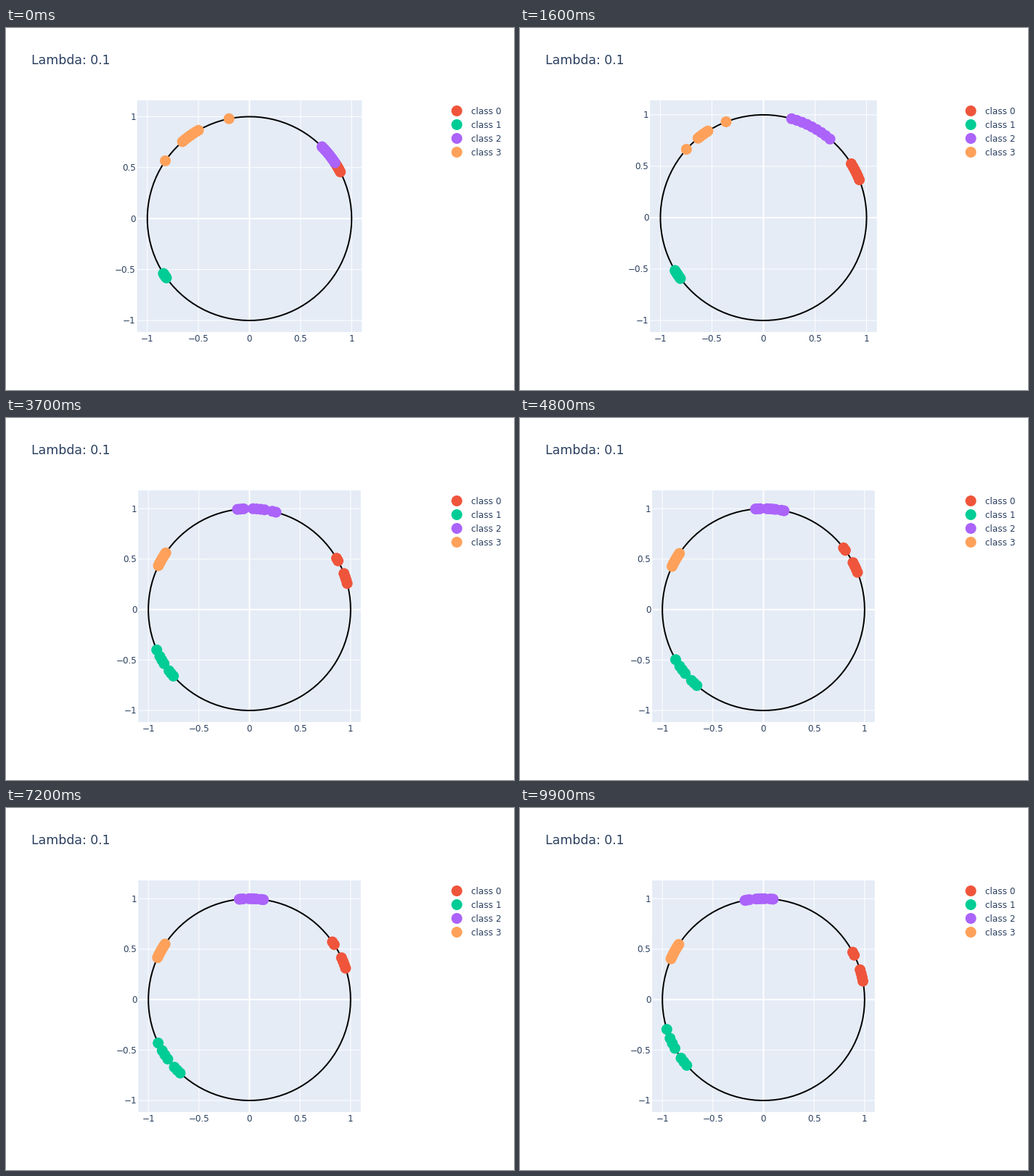
Recreate the animation shown at these times as a matplotlib script. Size 700x500 px, loop 10000 ms.

```python
import numpy as np
import matplotlib.pyplot as plt
from matplotlib.animation import FuncAnimation
from matplotlib.patches import Rectangle

W, H, DPI = 700, 500, 100
FRAMES, INTERVAL = 100, 100
PX = 72 / DPI                      # points per pixel
INK, PANEL = "#2a3f5f", "#e5ecf6"
MID_X, TOP, BOTTOM = 335.5, 100, 420
TICKS = np.linspace(-1, 1, 5)
STEPS = np.arange(FRAMES)


def smooth(keys, values):
    """Monotone cubic through a few key points, for every step."""
    x, y = np.array(keys), np.array(values, float)
    h = np.diff(x)
    d = np.diff(y) / h
    m = np.concatenate([d[:1], np.zeros(len(y) - 2), d[-1:]])
    for i in range(1, len(y) - 1):
        if d[i - 1] * d[i] > 0:
            m[i] = 2 * d[i - 1] * d[i] / (d[i - 1] + d[i])
    k = np.clip(np.searchsorted(x, STEPS, "right") - 1, 0, len(h) - 1)
    s = (STEPS - x[k]) / h[k]
    return ((1 + 2 * s) * (1 - s) ** 2 * y[k] + s * (1 - s) ** 2 * h[k] * m[k]
            + s * s * (3 - 2 * s) * y[k + 1] + s * s * (s - 1) * h[k] * m[k + 1])


def runs(*parts):
    """Evenly filled stretches (start, end, count) of the unit interval."""
    return np.concatenate([np.linspace(*p) for p in parts])


def even(n):
    return np.linspace(0, 1, n)


def cluster(path, early, late, swing=0):
    """Angles per step: path maps step to (centre, width) in degrees."""
    centre, width = (smooth(list(path), v) for v in zip(*path.values()))
    mix = np.clip((STEPS - 20) / 15, 0, 1)[:, None]
    share = early + (late - early) * mix - 0.5
    return np.radians((centre + swing)[:, None] + width[:, None] * share)


# classes 0 and 1 sway together once the clusters have parted
sway = smooth([0, 27, 37, 61, 82, 99], [0, 0, 16.2, 26.8, 13.5, 12.7])

COLORS = ["#EF553B", "#00CC96", "#AB63FA", "#FFA15A"]
groups = [
    cluster({0: (29.9, 5.3), 16: (26.6, 10), 27: (6.6, 15), 99: (6.6, 17.5)},
            even(6), runs((0, .38, 4), (.89, 1, 2)), sway),
    cluster({0: (214.1, 3), 16: (213.6, 5.4), 27: (196.2, 16), 99: (196.2, 23.5)},
            even(7), runs((0, 0, 1), (.23, .5, 3), (.78, 1, 3)), sway),
    cluster({0: (39, 11.6), 16: (62, 24.3), 27: (90.2, 39.4), 37: (85.8, 22),
             61: (87.7, 13.3), 99: (92.5, 16)},
            even(9), runs((0, .1, 2), (.3, .6, 4), (.84, 1, 3))),
    cluster({0: (123.5, 43.9), 16: (124.8, 27.1), 27: (141.5, 11), 37: (150, 8.4),
             99: (151.5, 9.3)},
            runs((0, 0, 1), (.42, .67, 7), (1, 1, 1)), even(9)),
]
angles = np.hstack(groups)
dot_colors = np.repeat(COLORS, [g.shape[1] for g in groups])

fig = plt.figure(figsize=(W / DPI, H / DPI), dpi=DPI, facecolor="white")
ax = fig.add_axes([0, 0, 1, 1])
ax.set(xlim=(0, W), ylim=(H, 0))
ax.axis("off")


def text(x, y, s, size=12, ha="left"):
    return ax.text(x, y, s, fontsize=size * PX, family="DejaVu Sans",
                   color=INK, ha=ha, va="baseline")


def line(color, width, z):
    return ax.plot([], [], color=color, lw=width * PX, zorder=z,
                   solid_capstyle="butt", snap=False)[0]


def dots(x, y, colors):
    return ax.scatter(x, y, s=(15 * PX) ** 2, c=list(colors), linewidths=0, zorder=4)


def label(t):
    return f"{t:g}".replace("-", "−")


text(35, 50, "Lambda: 0.1", 17.3)
rows = 114.5 + 19 * np.arange(len(COLORS))
dots(np.full(len(rows), 621.2), rows, COLORS)
for n, y in enumerate(rows):
    text(641.2, y + 4.5, f"class {n}")

panel = ax.add_patch(Rectangle((0, TOP), 1, BOTTOM - TOP, fc=PANEL, lw=0,
                               zorder=0, snap=False))
widths = [2 if t == 0 else 1 for t in TICKS]
v_grid = [line("white", w, w / 2) for w in widths]
h_grid = [line("white", w, w / 2) for w in widths]
x_labels = [text(0, 433.3, label(t), ha="center") for t in TICKS]
y_labels = [text(0, 0, label(t), ha="right") for t in TICKS]
ring = line("black", 2, 3)
points = dots(np.zeros(len(dot_colors)), np.zeros(len(dot_colors)), dot_colors)
turn = np.linspace(0, 2 * np.pi, 100)


def draw(i):
    a = angles[i]
    # autorange: markers need more headroom than the ring
    unit = min(144, 278.7 / (1 + np.sin(a).max()))
    mid_y = 404 - unit
    left, right = MID_X - 1.1 * unit, MID_X + 1.1 * unit
    panel.set_x(left)
    panel.set_width(right - left)
    for n, t in enumerate(TICKS):
        x, y = MID_X + t * unit, mid_y - t * unit
        v_grid[n].set_data([x, x], [TOP, BOTTOM])
        h_grid[n].set_data([left, right], [y, y])
        x_labels[n].set_x(x)
        y_labels[n].set_position((left - 1.8, y + 4.3))
    ring.set_data(MID_X + unit * np.cos(turn), mid_y - unit * np.sin(turn))
    points.set_offsets(np.column_stack([MID_X + unit * np.cos(a),
                                        mid_y - unit * np.sin(a)]))
    return []


anim = FuncAnimation(fig, draw, frames=FRAMES, interval=INTERVAL,
                     repeat=True, repeat_delay=0, blit=False)
plt.show()
```
